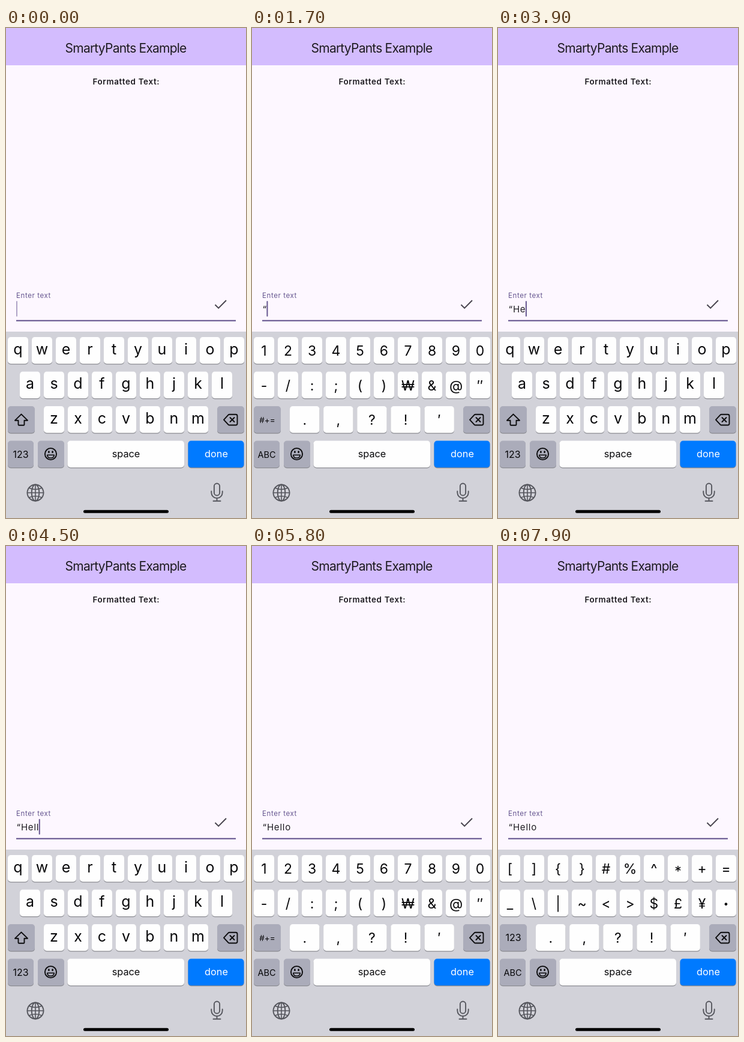
An HTML page that plays this animation: 400 px wide and 815 px high, repeating every 8000 ms.

```html
<!DOCTYPE html>
<html lang="en">
<head>
<meta charset="utf-8">
<title>Text formatter</title>
<style>
  html, body { margin: 0; width: 100%; height: 100%; overflow: hidden; background: #fef7ff; }
  svg { display: block; width: 100%; height: 100%; }
  text { font-family: Inter, "Noto Sans", sans-serif; fill: #08080a; white-space: pre; }
  .mid { text-anchor: middle; }
  .line { fill: none; stroke: #0b0b0d; stroke-width: 1.9; stroke-linecap: round; stroke-linejoin: round; }
  .grey { stroke: #55565d; }
</style>
</head>
<body>
<svg viewBox="0 0 400 815">
  <rect width="400" height="815" fill="#fdf7ff"/>
  <rect width="400" height="62" fill="#d3bcfe"/>
  <text class="mid" x="199.6" y="41" font-size="21" letter-spacing="-.78" style="fill:#1d1b20">SmartyPants Example</text>
  <text class="mid" x="200.3" y="94" font-size="13.5" font-weight="600" letter-spacing=".6" style="fill:#1d1b20">Formatted Text:</text>

  <text x="17" y="449" font-size="11.5" letter-spacing=".6" style="fill:#65558f">Enter text</text>
  <text id="typed" x="17.5" y="473" font-size="15" letter-spacing=".8" style="fill:#1d1b20"></text>
  <rect id="caret" y="454" width="2" height="26" rx="1" fill="#65558f"/>
  <rect x="17" y="485.7" width="366" height="2.1" fill="#65558f"/>
  <path d="M348.5 460.2l5.7 5.7L367 453" fill="none" stroke="#49454f" stroke-width="2"/>

  <rect y="505" width="400" height="310" fill="#d2d2d9"/>
  <g id="shared"></g>
  <g id="pages"></g>

  <g class="line">
    <path d="M363 651.6l7.4-8q.8-.9 2-.9h10.600q2.500 0 2.500 2.500v12.800q0 2.500-2.500 2.500h-10.600q-1.200 0-2-.9z"/>
    <path d="M373.500 648l7 7m0-7l-7 7"/>
    <circle cx="74.500" cy="708.500" r="9.600"/>
    <path d="M68.800 710.300h11.400q-.7 5-5.700 5t-5.700-5z" stroke-width="1.600"/>
    <path d="M71.400 704.600v1.200m6.200-1.200v1.200" stroke-width="2.600"/>
  </g>
  <g class="line grey">
    <circle cx="49" cy="773" r="13.500"/>
    <ellipse cx="49" cy="773" rx="6.300" ry="13.500"/>
    <path d="M49 759.500v27M35.500 773h27M38.500 765q10.500 5 21 0M38.500 781q10.500-5 21 0" stroke-width="1.600"/>
    <rect x="346.900" y="757.500" width="9.200" height="20" rx="4.600"/>
    <path d="M342.300 770.500v2.300a9.200 9.200 0 0 0 18.400 0v-2.300M351.500 782v4.700M345.500 786.700h12"/>
  </g>
  <rect x="129" y="801.700" width="142" height="5" rx="2.500"/>
</svg>
<script>
const LOOP = 8000;
const WHITE = '#fefefe', GREY = '#abacba', BLUE = '#007aff';
const ROWS = [514, 571.5, 629, 686.5];
const NUDGE = { '*': 4, '•': -2.5 };
const TYPING = [[1600, '“'], [3600, 'H'], [3900, 'e'], [4200, 'l'], [4400, 'l'], [5000, 'o']];
const SCREENS = [
  [0, 'lower'], [500, 'digits'], [2500, 'lower'], [3300, 'upper'],
  [3600, 'lower'], [5500, 'digits'], [6700, 'symbols']
];

const $ = id => document.getElementById(id);

function add(parent, tag, attrs, content = '') {
  const node = document.createElementNS('http://www.w3.org/2000/svg', tag);
  for (const name in attrs) node.setAttribute(name, attrs[name]);
  node.textContent = content;
  return parent.appendChild(node);
}

function cap(parent, x, row, width, fill = WHITE) {
  const box = { x, width, height: 44.5, rx: 5 };
  add(parent, 'rect', { ...box, y: ROWS[row] + 1.2, fill: '#8b8c92' });
  add(parent, 'rect', { ...box, y: ROWS[row], fill });
}

function label(parent, str, x, y, size, color = '#08080a') {
  add(parent, 'text', { x, y, class: 'mid', 'font-size': size, style: `fill:${color}` }, str);
}

function keyRow(parent, chars, row, x, step, width, size, base) {
  [...chars].forEach((ch, i) => {
    const left = x + i * step;
    cap(parent, left, row, width);
    label(parent, ch, left + width / 2, ROWS[row] + base + (NUDGE[ch] || 0), ch === '•' ? 15 : size);
  });
}

function letterPage(rows, shifted) {
  const page = add($('pages'), 'g', {});
  const [size, base] = shifted ? [23, 30.5] : [25, 28.5];
  rows.forEach((chars, row) => keyRow(page, chars, row, [3, 23, 63][row], 40, 34, size, base));
  cap(page, 3, 2, 45, shifted ? WHITE : GREY);
  add(page, 'path', {
    d: 'M25.500 642.300l10.500 10.400h-5.500v6.800q0 1.300-1.300 1.300h-7.400q-1.300 0-1.300-1.300v-6.800h-5.500z',
    class: 'line', style: shifted ? 'fill:#0b0b0d' : ''
  });
  label(page, '123', 24.5, 715, 16);
  return page;
}

function signPage(rows, toggle, toggleSize) {
  const page = add($('pages'), 'g', {});
  rows.forEach((chars, row) => keyRow(page, chars, row, 3, 40, 34, 23, 31));
  keyRow(page, '.,?!′', 2, 63, 56.1, 49.5, 23, 30.5);
  cap(page, 3, 2, 45, GREY);
  label(page, toggle, 25.5, 657, toggleSize);
  label(page, 'ABC', 24.5, 714.5, 14.5);
  return page;
}

const shared = $('shared');
cap(shared, 352, 2, 45, GREY);
cap(shared, 3, 3, 43, GREY);
cap(shared, 53, 3, 44, GREY);
cap(shared, 102.5, 3, 194.5);
cap(shared, 303.5, 3, 93, BLUE);
label(shared, 'space', 200, 713.5, 16.3);
label(shared, 'done', 350.5, 713.5, 16.3, '#fff');

const letters = ['qwertyuiop', 'asdfghjkl', 'zxcvbnm'];
const pages = {
  lower: letterPage(letters, false),
  upper: letterPage(letters.map(s => s.toUpperCase()), true),
  digits: signPage(['1234567890', '-/:;()₩&@″'], '#+=', 13.5),
  symbols: signPage(['[]{}#%^*+=', '_\\|~<>$£¥•'], '123', 16)
};

// Half a second on, half a second off, with short fades; a keystroke restarts it lit.
function caretOpacity(sinceKey, freshKey) {
  if (freshKey && sinceKey < 400) return 1;
  const phase = sinceKey % 1000;
  const fromLit = Math.min(Math.abs(phase - 250), Math.abs(phase - 1250));
  return Math.max(0, Math.min(1, (300 - fromLit) / 100));
}

function render(t) {
  const keys = TYPING.filter(([at]) => at <= t);
  const screen = SCREENS.filter(([at]) => at <= t).pop()[1];
  for (const name in pages) pages[name].style.display = name === screen ? '' : 'none';

  const typed = $('typed'), str = keys.map(k => k[1]).join('');
  if (typed.textContent !== str) typed.textContent = str;
  const width = str ? typed.getComputedTextLength() : 0;
  const lastKey = keys.length ? keys[keys.length - 1][0] : 0;
  $('caret').setAttribute('x', 17 + width);
  $('caret').setAttribute('opacity', caretOpacity(t - lastKey, keys.length > 0));
}

const start = performance.now();
function tick() {
  render((performance.now() - start) % LOOP);
  requestAnimationFrame(tick);
}
tick();
</script>
</body>
</html>
```
